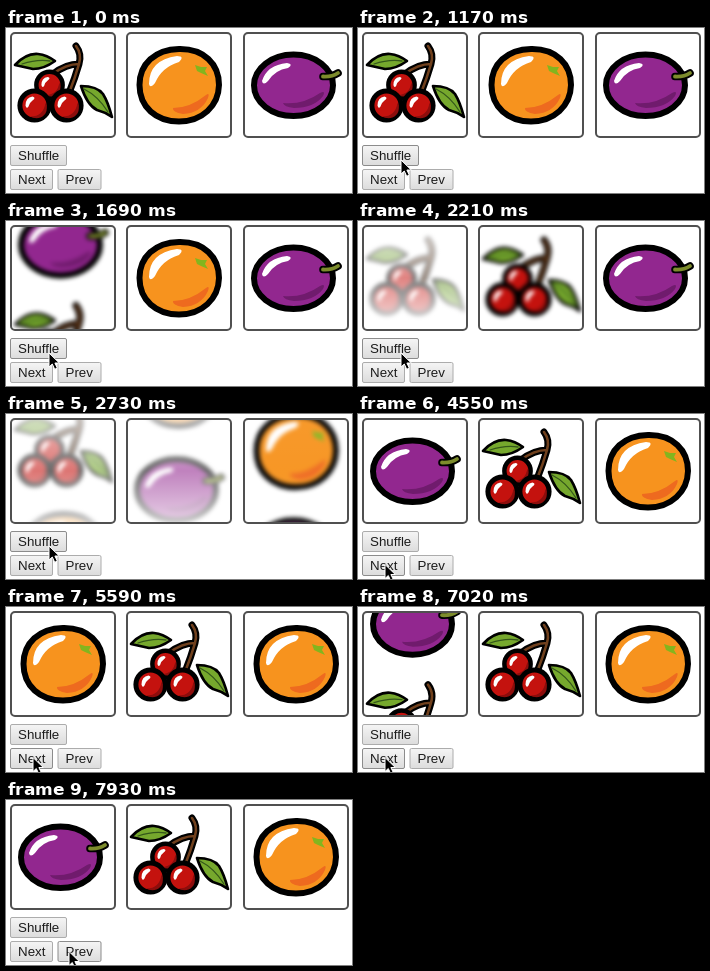
An HTML page that plays this animation: 346 by 165 pixels, repeating every 8000 ms.

```html
<!DOCTYPE html>
<html lang="en">
<head>
<meta charset="utf-8">
<title>Fruit reels</title>
<style>
  html, body { margin: 0; height: 100%; overflow: hidden; background: #fff; }
  svg { display: block; width: 100vw; height: 100vh; }
  text { font: 13.33px "Liberation Sans", Arial, sans-serif; fill: #1c1c1c; }
  .button { fill: url(#face); stroke: #acacac; }
  .hover { stroke: #8c8c8c; }
</style>
</head>
<body>
<svg viewBox="0 0 346 165">
  <defs>
    <linearGradient id="face" x2="0" y2="1">
      <stop stop-color="#f5f5f5"/><stop offset="1" stop-color="#dcdcdc"/>
    </linearGradient>
    <linearGradient id="veil" x2="0" y2="1">
      <stop stop-color="#fff" stop-opacity=".8"/>
      <stop offset=".5" stop-color="#fff" stop-opacity=".48"/>
      <stop offset="1" stop-color="#fff" stop-opacity=".9"/>
    </linearGradient>
    <clipPath id="window"><rect x="6" y="6" width="102" height="102" rx="3"/></clipPath>

    <g id="ball">
      <circle r="14.6" stroke="#000" stroke-width="5" fill="#c4120e"/>
      <path d="M-4 11Q9 11 11 -3Q15 8 6 12Q1 14 -4 11Z" fill="#8d0d0c"/>
      <path d="M-9 0Q-9 -8 -2 -9Q2 -8 -2 -5Q-5 -3 -6 1Q-8 4 -9 0Z" fill="#fff"/>
    </g>

    <g id="cherry" stroke-linecap="round" stroke-linejoin="round">
      <g fill="#76a82d" stroke="#000" stroke-width="2.6">
        <path d="M9 37Q20 25 32 26Q41 27 49 33Q38 41 27 41Q18 39 9 37Z"/>
        <path d="M75 58Q91 58 97 66Q102 74 106 89Q99 84 91 82Q81 77 75 58Z"/>
      </g>
      <path d="M16 36Q31 31 44 33M78 61Q92 68 102 84" fill="none" stroke="#34571a" stroke-width="1.3"/>
      <path d="M70 18Q76 26 73 36Q60 36 47 46M73 36Q69 50 63 65" fill="none" stroke="#000" stroke-width="7"/>
      <path d="M70 18Q76 26 73 36Q60 36 47 46M73 36Q69 50 63 65" fill="none" stroke="#70401d" stroke-width="2.6"/>
      <use href="#ball" transform="translate(43.500 57) scale(.9)"/>
      <use href="#ball" x="28.500" y="77.500"/>
      <use href="#ball" x="60.500" y="77.500"/>
    </g>

    <g id="orange">
      <path d="M57 21C82 20.500 97 36 97 57C96.500 78 80 93.500 57 93.500C34 93.500 17.500 79 17.500 57C17.500 36 33 21.500 57 21Z"
        fill="#f7931e" stroke="#000" stroke-width="6"/>
      <path d="M27 56Q27 32 55 28Q63 28 57 34Q40 39 33 55Q28 61 27 56Z" fill="#fff"/>
      <path d="M51 80Q68 80 84 67Q88 64 86 70Q79 85 61 86Q50 84 51 80Z" fill="#ee6a1f"/>
      <path d="M73 37L79 39L85 39L83 43L86 48L79 45L75 43Z" fill="#83b51e"/>
    </g>

    <g id="plum" stroke-linecap="round">
      <ellipse cx="54.500" cy="57.300" rx="39.500" ry="30.800" fill="#92278f" stroke="#000" stroke-width="6"/>
      <path d="M23 53Q28 37 48 35Q55 36 49 40Q36 42 29 53Q24 58 23 53Z" fill="#fff"/>
      <path d="M44 75Q64 77 81 65Q87 62 84 68Q75 80 55 80Q45 79 44 75Z" fill="#701b6d"/>
      <path d="M84 48.500Q93 49 99 45" fill="none" stroke="#000" stroke-width="7.600"/>
      <path d="M84 48.500Q93 49 99 45" fill="none" stroke="#7d8c2c" stroke-width="3.800"/>
    </g>
  </defs>

  <g id="reels"></g>
  <g id="buttons"></g>
  <path id="cursor" d="M0 0V14L3.300 11L5.700 16.300L8.300 15.100L5.900 10H10.300Z" fill="#000" stroke="#fff" stroke-width="1"/>
</svg>

<script>
const $ = id => document.getElementById(id);
const LOOP = 8000, PITCH = 100;
const fruits = ['cherry', 'plum', 'orange'];   // order in which they drop into view

const linear = u => u;
const swing = u => .5 - Math.cos(u * Math.PI) / 2;
const settle = u => 1 - (1 - u) ** 1.6;
const clamp = u => Math.max(0, Math.min(1, u));

// keys: [time, value, easing towards this key]
function track(keys, t) {
  const i = keys.findIndex(k => k[0] > t);
  if (i < 0) return keys[keys.length - 1][1];
  if (!i) return keys[0][1];
  const [t0, a] = keys[i - 1], [t1, b, ease = swing] = keys[i];
  return a + (b - a) * ease((t - t0) / (t1 - t0));
}

const reels = [
  { x: 0, first: 0, start: 1543, end: 3200,
    keys: [[1543, 0], [2210, 3, linear], [3200, 7, settle],
      [4800, 7], [5300, 8], [5800, 8], [6300, 9], [6740, 9], [7240, 10]] },
  { x: 116, first: 2, start: 2043, end: 3200,
    keys: [[2043, 0], [2210, 1, linear], [3200, 7, settle]] },
  { x: 233, first: 1, start: 2543, end: 4250,
    keys: [[2543, 0], [3250, 3, linear], [4250, 7, settle]] }
];

const buttons = [
  { label: 'Shuffle', x: 4, y: 117, w: 57 },
  { label: 'Next', x: 4, y: 141, w: 43 },
  { label: 'Prev', x: 51.5, y: 141, w: 44 }
];

const cursorX = [[450, 75], [950, 43], [4200, 43], [4550, 27], [7450, 27], [7850, 63]];
const cursorY = [[450, 167], [950, 132], [4200, 132], [4550, 150.5], [7450, 150.5], [7850, 151.5]];

$('reels').innerHTML = reels.map(r => `<g transform="translate(${r.x})">
  <g clip-path="url(#window)"><g class="strip"><use/><use/></g>
  <rect class="veil" x="5" y="5" width="104" height="104" fill="url(#veil)"/></g>
  <rect x="5" y="5" width="104" height="104" rx="4" fill="none" stroke="#505050" stroke-width="2"/></g>`).join('');

$('buttons').innerHTML = buttons.map(b =>
  `<rect class="button" x="${b.x + .5}" y="${b.y + .5}" width="${b.w - 1}" height="20" rx="1.5"/>
  <text x="${b.x + 8}" y="${b.y + 15}">${b.label}</text>`).join('');

const strips = document.querySelectorAll('.strip');
const veils = document.querySelectorAll('.veil');
const faces = document.querySelectorAll('.button');

function drawReel(r, i, t) {
  const pos = track(r.keys, t), step = Math.floor(pos), part = pos - step;
  [...strips[i].children].forEach((tile, n) => {
    tile.setAttribute('href', '#' + fruits[(r.first + step + n) % 3]);
    tile.setAttribute('y', (part - n) * PITCH);
  });
  const since = t - r.start, left = r.end - t;
  const blur = 2.3 * clamp(since / 150) * clamp(left / 300);
  strips[i].style.filter = blur > 0 ? `blur(${blur}px)` : 'none';
  veils[i].style.opacity = clamp((since - 170) / 250) * clamp((left - 250) / 250);
}

function draw(now) {
  const t = now % LOOP;
  reels.forEach((r, i) => drawReel(r, i, t));
  const x = track(cursorX, t), y = track(cursorY, t);
  $('cursor').setAttribute('transform', `translate(${x} ${y})`);
  buttons.forEach((b, i) => faces[i].classList.toggle('hover',
    x >= b.x && x < b.x + b.w && y >= b.y && y < b.y + 21));
  requestAnimationFrame(() => draw(performance.now() - origin));
}

const origin = performance.now();
draw(0);
</script>
</body>
</html>
```
